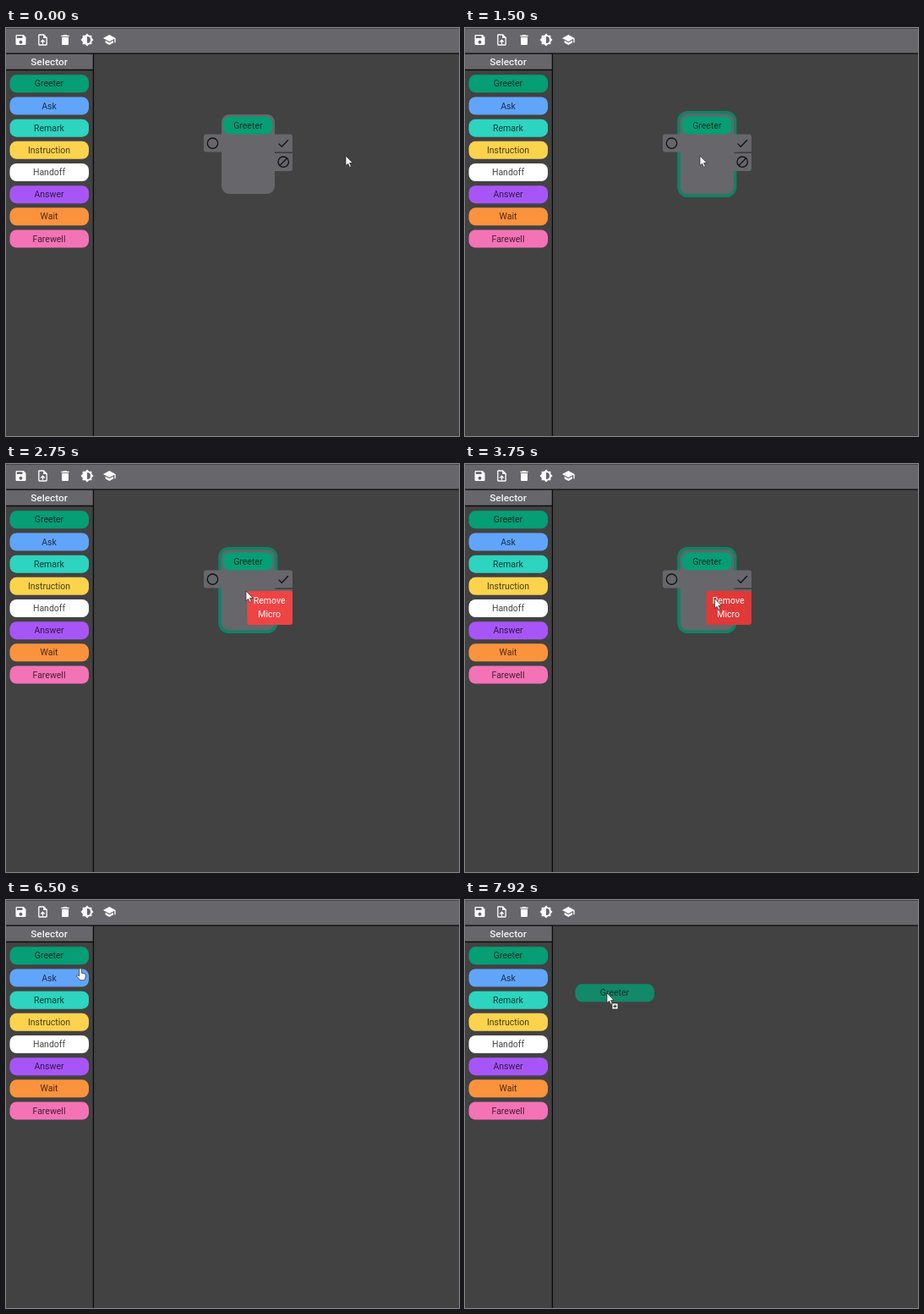
Recreate the animation shown at these times as an HTML page. Size 536x482 px, loop 8000 ms.

```html
<!DOCTYPE html>
<html lang="en">
<head>
<meta charset="utf-8">
<title>Flow editor</title>
<style>
  html, body { margin: 0; width: 100%; height: 100%; overflow: hidden; background: #424242; }
  svg { display: block; }
  text { font: 10.5px Roboto, Arial, sans-serif; text-anchor: middle; fill: #000; fill-opacity: .72; }
  .light { fill: #fff; fill-opacity: 1; }
  .title { font-size: 11.8px; font-weight: 500; fill: #f4f4f5; fill-opacity: 1; }
  .panel { fill: #66666b; }
  .line { fill: none; stroke: #111; stroke-width: 1.3; }
  .pointer { fill: #fff; stroke: #222; stroke-width: .7; }
</style>
</head>
<body>
<svg id="stage" width="536" height="482" viewBox="0 0 536 482">
  <rect width="536" height="482" fill="#424242"/>
  <rect class="panel" width="536" height="30"/>
  <rect width="536" height="1" fill="#45454a"/>
  <rect class="panel" y="31" width="103" height="18"/>
  <path d="M0 30.2H536M0 49.5H103M103.4 30V482" stroke="#0c0c0c" stroke-width="1.3"/>
  <text class="title" x="51" y="44">Selector</text>
  <g id="icons" fill="#fff"></g>
  <g id="list"></g>

  <g id="node">
    <rect id="ring" x="253" y="99.7" width="66.6" height="98.6" rx="10.5" fill="#66666b" stroke="#108264" stroke-width="3.6"/>
    <rect class="panel" x="255" y="102" width="63" height="94" rx="9"/>
    <rect x="257" y="104.5" width="58.5" height="21" rx="8" fill="#059e75"/>
    <text x="286.3" y="118.6">Greeter</text>
    <path class="panel" d="M255 125.5v21h-18q-3 0-3-3v-15q0-3 3-3zM318 125.5h18q3 0 3 3v18h-21zM318 148h21v18q0 3-3 3h-18z"/>
    <path d="M318 147.3h21" stroke="#3a3a3a"/>
    <g class="line">
      <circle cx="244.5" cy="136.2" r="6.2"/>
      <path d="M322.7 136.6l3.6 3.6 7.6-8"/>
      <circle cx="328.2" cy="158.2" r="6.2"/>
      <path d="M323.8 162.6l8.8-8.8"/>
    </g>
  </g>

  <g id="menu">
    <rect x="285.5" y="150" width="53.5" height="40" rx="3"/>
    <text class="light" x="311.7" y="165.4">Remove</text>
    <text class="light" x="311.7" y="181.2">Micro</text>
  </g>

  <g id="ghost" opacity=".78"></g>

  <g id="cursor">
    <path id="arrow" class="pointer" d="M0 0V11.6L2.7 9.2L4.5 13.4L6.4 12.6L4.6 8.5H8.2Z"/>
    <path id="hand" class="pointer" d="M-1.4 1C-1.4-.6 1.4-.6 1.4 1V5.2L5 6Q6.6 6.4 6.4 8L5.8 11.4Q5.4 13.8 3.6 13.8H0L-4.6 8.8Q-4.4 7.2-2.8 8L-1.4 9Z"/>
    <g id="denied" fill="none">
      <circle r="5" stroke="#fff" stroke-width="3.4"/>
      <path d="M-3.5-3.5L3.5 3.5" stroke="#fff" stroke-width="3"/>
      <circle r="5" stroke="#222" stroke-width="1.7"/>
      <path d="M-3.5-3.5L3.5 3.5" stroke="#222" stroke-width="1.5"/>
    </g>
    <g id="copy">
      <rect class="pointer" x="6" y="12" width="7" height="7"/>
      <path d="M7.5 15.5h4M9.5 13.5v4" stroke="#222"/>
    </g>
  </g>
</svg>
<script>
const $ = id => document.getElementById(id);
const LOOP = 8000, STEP = 1000 / 12;
const GRAB = [42, 66];

const icons = [
  [17.5, "M17 3H5c-1.1 0-2 .9-2 2v14c0 1.1.9 2 2 2h14c1.1 0 2-.9 2-2V7zm-5 16a3 3 0 1 1 0-6 3 3 0 0 1 0 6zm3-10H5V5h10z"],
  [43.5, "M14 2H6c-1.1 0-2 .9-2 2v16c0 1.1.9 2 2 2h12c1.1 0 2-.9 2-2V8zm4 18H6V4h7v5h5zM8 15l1.4 1.4 1.6-1.6V19h2v-4.2l1.6 1.6L16 15l-4-4z"],
  [70, "M6 19c0 1.1.9 2 2 2h8c1.1 0 2-.9 2-2V7H6zM19 4h-3.5l-1-1h-5l-1 1H5v2h14z"],
  [96, "M20 15.3L23.3 12 20 8.7V4h-4.7L12 .7 8.7 4H4v4.7L.7 12 4 15.3V20h4.7l3.3 3.3 3.3-3.3H20zM12 18V6a6 6 0 0 1 0 12z"],
  [122.3, "M5 13.2v4L12 21l7-3.8v-4L12 17zM12 3L1 9l11 6 9-4.9V17h2V9z"]
];
$("icons").innerHTML = icons.map(([x, d]) =>
  `<path transform="translate(${x - 8} 6) scale(.667)" d="${d}"/>`).join("");

const pill = (name, color, y) =>
  `<rect x="4.5" y="${y - 10.5}" width="93.5" height="21" rx="8" fill="${color}"/>
   <text x="51" y="${y + 3.6}">${name}</text>`;
const blocks = {
  Greeter: "#059e75", Ask: "#60a5fa", Remark: "#2dd4bf", Instruction: "#fcd34d",
  Handoff: "#fff", Answer: "#a855f7", Wait: "#fb923c", Farewell: "#f472b6"
};
$("list").innerHTML = Object.entries(blocks)
  .map(([name, color], i) => pill(name, color, 65.8 + i * 26.17)).join("");
$("ghost").innerHTML = pill("Greeter", blocks.Greeter, 65.8);

// Cursor path: [step, x, y]
const path = [
  [0, 402, 151], [10, 277, 152], [11, 277, 152], [16, 278, 151], [18, 278, 151],
  [29, 284, 150], [38, 284, 150], [39, 287, 153], [40, 287, 153], [50, 304, 165],
  [69, 304, 165], [78, 88, 81], [79, 86, 80], [82, ...GRAB], [86, ...GRAB],
  [89, 67, 76], [95, 168, 110]
];

function cursorAt(n) {
  const i = path.findIndex(p => p[0] > n);
  if (i < 0) return path[path.length - 1].slice(1);
  const [a, ax, ay] = path[i - 1], [b, bx, by] = path[i];
  let k = (n - a) / (b - a);
  if (n < 86) k *= k * (3 - 2 * k);
  return [ax + (bx - ax) * k, ay + (by - ay) * k];
}

const show = (id, on) => $(id).setAttribute("display", on ? "inline" : "none");
const move = (id, x, y) => $(id).setAttribute("transform", `translate(${x} ${y})`);

function draw(now) {
  const n = Math.floor((now % LOOP + 4) / STEP);
  const [x, y] = cursorAt(n);
  const dragging = n >= 87, overList = x < 98, overCanvas = x > 104;

  show("node", n < 53);
  show("ring", n >= 18);
  show("menu", n >= 31 && n < 53);
  $("menu").setAttribute("fill", n >= 39 ? "#e13838" : "#ef4444");

  show("ghost", dragging);
  move("ghost", x - GRAB[0], y - GRAB[1]);

  move("cursor", x, y);
  show("arrow", dragging ? overCanvas : !overList);
  show("hand", !dragging && overList);
  show("denied", dragging && !overCanvas);
  show("copy", dragging && overCanvas);
}

const start = performance.now();
function tick() {
  draw(performance.now() - start);
  requestAnimationFrame(tick);
}
tick();
</script>
</body>
</html>
```
